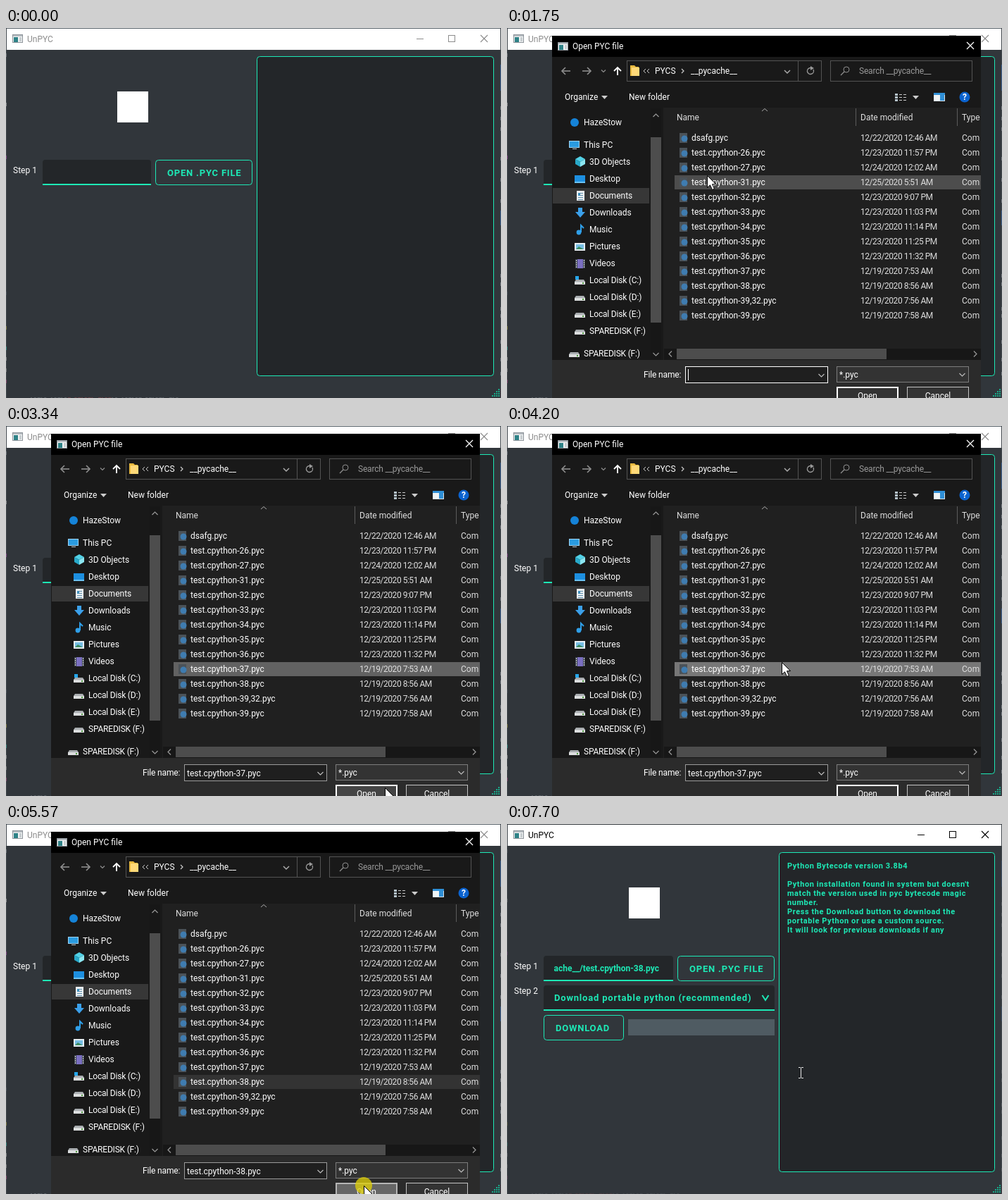
Recreate the animation shown at these times as an HTML page with a canvas. Size 703 px wide and 525 px high, loop 8000 ms.

```html
<!DOCTYPE html>
<html lang="en">
<head>
<meta charset="utf-8">
<title>UnPYC</title>
<style>
html, body { margin: 0; width: 100%; height: 100%; overflow: hidden; background: #31363b; }
canvas { display: block; width: 703px; height: 525px; }
</style>
</head>
<body>
<canvas id="stage" width="703" height="525"></canvas>
<script>
const g = document.getElementById('stage').getContext('2d');
const LOOP = 8000, TEAL = '#1de9b6', DARK = '#232629', FONT = 'Roboto, "Open Sans", sans-serif';

const FILES = [
  ['dsafg', '12/22/2020 12:46 AM'],
  ['test.cpython-26', '12/23/2020 11:57 PM'],
  ['test.cpython-27', '12/24/2020 12:02 AM'],
  ['test.cpython-31', '12/25/2020 5:51 AM'],
  ['test.cpython-32', '12/23/2020 9:07 PM'],
  ['test.cpython-33', '12/23/2020 11:03 PM'],
  ['test.cpython-34', '12/23/2020 11:14 PM'],
  ['test.cpython-35', '12/23/2020 11:25 PM'],
  ['test.cpython-36', '12/23/2020 11:32 PM'],
  ['test.cpython-37', '12/19/2020 7:53 AM'],
  ['test.cpython-38', '12/19/2020 8:56 AM'],
  ['test.cpython-39,32', '12/19/2020 7:56 AM'],
  ['test.cpython-39', '12/19/2020 7:58 AM']
];
const PLACES = ['3D Objects', 'Desktop', 'Documents', 'Downloads', 'Music', 'Pictures', 'Videos',
  'Local Disk (C:)', 'Local Disk (D:)', 'Local Disk (E:)', 'SPAREDISK (F:)'];
const REPORT = ['Python Bytecode version 3.8b4', '',
  "Python installation found in system but doesn't",
  'match the version used in pyc bytecode magic', 'number.',
  'Press the Download button to download the',
  'portable Python or use a custom source.',
  'It will look for previous downloads if any'];

// Pointer legs: start, end, steps, from x y, to x y
const LEGS = [
  [300, 770, 7, 474, 353, 270, 217],
  [990, 1260, 4, 276, 212, 278, 210],
  [1670, 1750, 2, 280, 210, 284, 209],
  [1870, 2260, 6, 288, 222, 345, 335],
  [2860, 2960, 2, 430, 430, 574, 503],
  [3140, 3410, 5, 560, 512, 515, 513],
  [3590, 3730, 2, 455, 440, 390, 337],
  [4200, 4230, 2, 390, 335, 390, 326],
  [4380, 4540, 3, 389, 338, 372, 362],
  [4780, 5140, 6, 375, 368, 500, 497],
  [5320, 5320, 1, 508, 513, 508, 513],
  [5810, 6060, 4, 490, 470, 417, 353]
];
const CLICKS = [[1080, 1260], [2560, 2700], [3880, 3970], [4540, 4780], [5570, 5660]];

const within = (t, a, b) => t >= a && t < b;

function pointer(t) {
  const leg = LEGS.filter(l => t >= l[0]).pop();
  if (!leg) return null;
  const [a, b, n, x0, y0, x1, y1] = leg;
  const k = n < 2 ? 1 : Math.min(n - 1, Math.floor((t - a) / (b - a) * (n - 1) + 1e-6)) / (n - 1);
  return { x: Math.round(x0 + (x1 - x0) * k), y: Math.round(y0 + (y1 - y0) * k) };
}

function box(x, y, w, h, color) {
  g.fillStyle = color;
  g.fillRect(x, y, w, h);
}
function frame(x, y, w, h, color, fill) {
  if (fill) box(x, y, w, h, fill);
  g.strokeStyle = color;
  g.lineWidth = 1;
  g.strokeRect(x + .5, y + .5, w - 1, h - 1);
}
function rounded(x, y, w, h, r, fill, stroke) {
  g.beginPath();
  g.roundRect(x, y, w, h, r);
  if (fill) { g.fillStyle = fill; g.fill(); }
  if (stroke) { g.strokeStyle = stroke; g.lineWidth = 1; g.stroke(); }
}
function dot(x, y, r, color) {
  g.fillStyle = color;
  g.beginPath();
  g.arc(x, y, r, 0, 7);
  g.fill();
}
function line(color, width, ...p) {
  g.strokeStyle = color;
  g.lineWidth = width;
  g.beginPath();
  for (let i = 0; i < p.length; i += 2) g.lineTo(p[i], p[i + 1]);
  g.stroke();
}
function poly(color, ...p) {
  g.fillStyle = color;
  g.beginPath();
  for (let i = 0; i < p.length; i += 2) g.lineTo(p[i], p[i + 1]);
  g.fill();
}
// y is the middle of the line
function text(s, x, y, color = '#fff', font = '12px', gap = 0, align = 'left') {
  g.font = font + ' ' + FONT;
  g.letterSpacing = gap + 'px';
  g.textAlign = align;
  g.fillStyle = color;
  g.fillText(s, x, y + 4);
}
const label = (s, x, y) => text(s, x, y, TEAL, 'bold 13px', .8);

// A negative rise points the chevron up
function chevron(x, y, size, color, width = 1.2, rise = size / 2) {
  line(color, width, x - size, y - rise, x, y + rise, x + size, y - rise);
}

function edges(active) {
  g.globalAlpha = active ? .25 : .6;
  [[38, '#8a8f94'], [108, '#bbb'], [183, '#b04fb0'], [376, '#59636b'], [425, '#a8a040'],
   [454, '#2fb5a5'], [469, '#aaa'], [485, '#999'], [501, '#b04f86']]
    .forEach(([y, c]) => box(0, y - 2, 1, 5, c));
  [113, 128, 143, 185, 215, 245, 351, 363, 398, 408, 445, 470, 490]
    .forEach(y => box(702, y - 2, 1, 5, '#9aa0a5'));
  box(702, 52, 1, 37, '#3f76bd');
  box(702, 259, 1, 21, '#3f76bd');
  for (let i = 0; i < 44; i++) {
    const x = 35 + i * 4.8;
    if (i % 7 !== 5) box(x, 524, 2 + i % 3, 1, x > 85 && x < 150 ? '#8d4b50' : '#747a80');
  }
  g.globalAlpha = 1;
}

function exeIcon(x, y) {
  frame(x, y, 15, 12, '#8b9298', '#f1f3f4');
  box(x + 1, y + 1, 13, 2, '#b7bdc2');
  box(x + 2, y + 4, 6, 7, '#2f8287');
  box(x + 10, y + 4, 3, 6, '#c7cdd0');
}

function field(x, y, w) {
  rounded(x, y, w, 36, [4, 4, 0, 0], DARK);
  box(x, y + 34, w, 2, TEAL);
}
function button(s, x, y, w) {
  rounded(x + .5, y + .5, w - 1, 35, 4, null, TEAL);
  label(s, x + 17, y + 19);
}

function app(active, done) {
  const shift = done ? 30 : 0;
  box(0, 0, 703, 525, '#31363b');
  box(0, 0, 703, 31, '#fff');
  box(0, 0, 703, 1, active ? '#33383d' : '#5b646b');
  box(0, 0, 1, 525, '#42484e');
  box(702, 0, 1, 525, '#42484e');
  edges(active);
  exeIcon(9, 9);
  const ink = active ? '#000' : '#8c8c8c';
  text('UnPYC', 30, 16, ink);
  line(ink, 1, 583, 15.5, 593, 15.5);
  g.strokeRect(628.5, 10.5, 9, 9);
  line(ink, 1.1, 674, 10, 684, 20);
  line(ink, 1.1, 684, 10, 674, 20);

  box(158 + shift / 2, 90, 44, 44, '#fff');
  text('Step 1', 10, 202);
  field(52, 187, 154 + shift);
  button('OPEN .PYC FILE', 212 + shift, 187, 138);
  rounded(356.5 + shift, 40.5, 336 - shift, 453, 4, DARK, TEAL);
  for (let i = 0; i < 4; i++)
    for (let j = 0; j <= i; j++) box(699 - j * 3, 512 + i * 3, 2, 2, '#19a98a');
  if (!done) return;

  g.save();
  g.beginPath();
  g.rect(67, 188, 152, 32);
  g.clip();
  text('ache__/test.cpython-38.pyc', 216, 205, TEAL, 'bold 12px', 0, 'right');
  g.restore();
  text('Step 2', 10, 237);
  field(52, 229, 328);
  label('Download portable python (recommended)', 67, 247);
  chevron(367, 246.5, 4.5, TEAL, 2, 3.5);
  button('DOWNLOAD', 52, 271, 114);
  box(172, 277, 208, 23, '#4f5b62');
  REPORT.forEach((s, i) => text(s, 398, 59 + i * 13, TEAL, 'bold 11px', .58));
}

function drive(x, y) {
  poly('#a9adb0', x + 2, y - 2, x + 13, y - 2, x + 15, y + 1, x, y + 1);
  box(x, y + 1, 15, 4, '#dcdedf');
  box(x + 11, y + 2, 2, 2, '#4c9a3c');
}
function monitor(x, y) {
  frame(x, y - 6, 15, 10, '#9fd4f3', '#2a9be0');
  box(x + 5, y + 5, 6, 1, '#bfc7cc');
}
const PLACE_ICONS = [
  (x, y) => {
    poly('#52d1e6', x, y - 4, x + 7, y - 8, x + 14, y - 4, x + 7, y);
    poly('#28a9c9', x, y - 4, x + 7, y, x + 7, y + 7, x, y + 3);
    poly('#8be6f1', x + 14, y - 4, x + 7, y, x + 7, y + 7, x + 14, y + 3);
  },
  (x, y) => { box(x - 1, y - 5, 15, 11, '#1d8fe0'); box(x - 1, y + 4, 15, 2, '#6cc4f5'); },
  (x, y) => {
    box(x + 2, y - 7, 11, 14, '#e9eef1');
    for (let i = 0; i < 4; i++) box(x + 4, y - 4 + i * 3, 7, 1, '#5f90ad');
    box(x + 4, y - 4, 3, 4, '#3f8fbd');
  },
  (x, y) => {
    box(x + 4, y - 7, 6, 6, '#3ba0ea');
    poly('#3ba0ea', x, y - 1, x + 14, y - 1, x + 7, y + 7);
  },
  (x, y) => {
    dot(x + 5, y + 4, 3.4, '#2f9fe8');
    line('#2f9fe8', 2, x + 8, y + 4, x + 8, y - 6, x + 12, y - 2);
  },
  (x, y) => {
    box(x - 1, y - 5, 15, 11, '#e5eef3');
    box(x + 1, y - 3, 11, 7, '#75bde3');
    poly('#3e8c62', x + 1, y + 4, x + 5, y, x + 12, y + 4);
  },
  (x, y) => {
    box(x, y - 6, 14, 13, '#39414a');
    box(x + 3, y - 6, 8, 13, '#7a6fc0');
    for (let i = 0; i < 4; i++) { box(x + 1, y - 5 + i * 3, 1, 2, '#ddd'); box(x + 12, y - 5 + i * 3, 1, 2, '#ddd'); }
  },
  (x, y) => { drive(x - 1, y + 1); box(x, y - 6, 5, 5, '#25a6ea'); }
];

function navPane() {
  dot(96, 134, 6, '#1583d8');
  text('HazeStow', 109, 134);
  monitor(88, 166);
  text('This PC', 109, 166);
  box(65, 227, 137, 22, '#373737');
  PLACES.forEach((s, i) => {
    const y = 190 + i * 24;
    (PLACE_ICONS[i] || ((x, yy) => drive(x - 1, yy)))(97, y);
    text(s, 117, y, '#fff', '12px', i > 6 ? -.2 : 0);
  });
  drive(88, 462);
  text('SPAREDISK (F:)', 109, 462, '#fff', '12px', -.2);
  box(204, 114, 15, 357, '#171717');
  box(204, 155, 15, 263, '#4d4d4d');
  chevron(211.5, 124, 4, '#999', 1.2, -2);
  chevron(211.5, 463, 4, '#999');
}

function toolbar() {
  const grey = '#8f8f8f';
  const arrow = (x, d, c) => {
    line(c, 1.6, x - 6, 61, x + 6, 61);
    line(c, 1.6, x + d, 56, x + 6 * d, 61, x + d, 66);
  };
  arrow(84, -1, grey);
  arrow(113, 1, grey);
  chevron(137, 61, 3, grey);
  line('#fff', 1.8, 157, 67, 157, 56);
  line('#fff', 1.8, 152, 61, 157, 56, 162, 61);

  frame(170, 46, 277, 30, '#535353');
  poly('#e8b93f', 175, 53, 181, 53, 183, 55, 187, 55, 187, 68, 175, 68);
  box(177, 56, 11, 12, '#ffd978');
  [194, 199].forEach(x => line('#ccc', 1, x + 3, 58, x, 61, x + 3, 64));
  text('PYCS', 210, 61);
  line('#ccc', 1.2, 248, 58, 251, 61, 248, 64);
  text('__pycache__', 261, 61);
  chevron(398, 62, 4, '#aaa', 1.5);
  box(413, 47, 1, 28, '#535353');
  g.strokeStyle = '#999';
  g.lineWidth = 1.4;
  g.beginPath();
  g.arc(431, 61, 4.5, -.5, 4.9);
  g.stroke();
  poly('#999', 431, 54, 436, 57, 431, 60);

  frame(459, 46, 202, 30, '#535353');
  g.strokeStyle = grey;
  g.beginPath();
  g.arc(482, 59, 4, 0, 7);
  g.stroke();
  line(grey, 1.3, 479, 62, 474, 67);
  text('Search __pycache__', 500, 61, '#999', '12px', -.2);

  text('Organize', 82, 98);
  poly('#ccc', 134, 96, 143, 96, 138.5, 101);
  text('New folder', 173, 98);
  for (let i = 0; i < 3; i++) {
    box(551, 93 + i * 4, 4, 3, '#b5c2ca');
    box(557, 94 + i * 4, 4, 1, '#ccc');
    box(563, 94 + i * 4, 4, 1, '#ccc');
  }
  poly('#ccc', 576, 96, 585, 96, 580.5, 101);
  frame(606, 92, 16, 12, '#d7e2e8', '#eef3f5');
  box(606, 92, 16, 3, '#2f8fd6');
  box(615, 95, 6, 8, '#2f8fd6');
  dot(650, 98, 7.5, '#0b63cf');
  text('?', 650, 98, '#fff', 'bold 12px', 0, 'center');
}

function fileList(hover, sel, blurred) {
  line('#aaa', 1, 362, 118, 366, 114.5, 370, 118);
  text('Name', 241, 127, '#ddd');
  text('Date modified', 502, 127, '#ddd');
  text('Type', 646, 127, '#ddd');
  box(495, 114, 1, 25, '#5c5c5c');
  box(639, 114, 1, 25, '#5c5c5c');
  FILES.forEach(([name, date], i) => {
    const y = 156 + i * 21;
    let fill = null;
    if (i === sel) fill = blurred ? '#333' : i === hover ? '#777' : '#626262';
    else if (i === hover) fill = '#4d4d4d';
    if (fill) box(238, y - 10, 435, 20, fill);
    box(245, y - 7, 11, 14, '#4b5258');
    dot(252, y + 1, 4.5, '#3f7cb0');
    text(name + '.pyc', 262, y);
    text(date, 502, y, '#ddd', '12px', -.47);
    text('Com', 646, y, '#ddd');
  });
  box(223, 455, 450, 16, '#171717');
  box(241, 455, 298, 15, '#4d4d4d');
  line('#999', 1.2, 234, 458.5, 230, 462.5, 234, 466.5);
  line('#999', 1.2, 663, 458.5, 667, 462.5, 663, 466.5);
}

function dialog(t, p) {
  g.save();
  g.beginPath();
  g.rect(64, 11, 609, 514);
  g.clip();
  box(64, 11, 609, 514, '#191919');
  box(64, 11, 609, 30, '#000');
  exeIcon(72, 20);
  text('Open PYC file', 93, 26);
  line('#fff', 1.2, 653, 20, 663, 30);
  line('#fff', 1.2, 663, 20, 653, 30);
  if (t < 1670) { g.restore(); return; }

  box(222, 113, 451, 358, '#202020');
  box(64, 471, 609, 54, '#2b2b2b');
  toolbar();
  navPane();
  const inList = p.x >= 238 && p.y >= 145 && p.y < 418;
  const sel = t >= 4540 ? 10 : t >= 2560 ? 9 : -1;
  const pressed = t >= 5570;
  fileList(inList ? Math.floor((p.y - 145) / 21) : -1, sel, pressed);

  text('File name:', 194, 492, '#fff', '12px', -.15);
  frame(253, 480, 203, 24, t < 2700 ? '#fff' : '#9b9b9b', '#1f1f1f');
  if (sel < 0) box(257, 484, 1, 16, '#fff');
  else text(FILES[sel][0] + '.pyc', 257, 493);
  chevron(446.5, 493, 4, '#bbb');
  const onFilter = p.x >= 468 && p.x < 655 && p.y >= 481 && p.y < 503;
  frame(468, 480, 188, 23, onFilter ? '#ccc' : '#7d7d7d', onFilter ? '#454545' : '#333');
  text('*.pyc', 472, 492);
  chevron(646.5, 492, 4, '#bbb');

  const onOpen = p.x >= 468 && p.x < 556 && p.y >= 509;
  box(468, 509, 88, 16, pressed ? '#b5b5b5' : '#fff');
  box(470, 511, 84, 14, pressed ? '#666' : onOpen ? '#454545' : '#333');
  text('Open', 512, 522, '#fff', '12px', 0, 'center');
  frame(568, 509, 88, 24, '#c4c4c4', '#333');
  text('Cancel', 612, 522, '#fff', '12px', 0, 'center');
  g.restore();
}

function drawPointer(p, beam) {
  const { x, y } = p;
  if (beam) {
    box(x, y - 7, 1, 14, '#e8e8e8');
    [-8, 7].forEach(d => { box(x - 3, y + d, 3, 1, '#e8e8e8'); box(x + 1, y + d, 3, 1, '#e8e8e8'); });
    return;
  }
  g.beginPath();
  [[0, 0], [0, 17], [4, 13.3], [7, 20], [10, 18.7], [7, 12.2], [12, 12]]
    .forEach(([dx, dy]) => g.lineTo(x + .5 + dx, y + .5 + dy));
  g.closePath();
  g.fillStyle = '#fff';
  g.fill();
  g.strokeStyle = '#000';
  g.lineWidth = 1;
  g.stroke();
}

function draw(t) {
  const p = pointer(t), done = t >= 7700, open = within(t, 1530, 5660);
  app(within(t, 990, 1260) || t >= 5810, done);
  if (open) dialog(t, p);
  if (!p) return;
  if (CLICKS.some(([a, b]) => within(t, a, b))) dot(p.x, p.y, 12, 'rgba(222,206,10,.78)');
  const overPanel = p.x > (done ? 386 : 356) && p.x < 693 && p.y > 40 && p.y < 494;
  drawPointer(p, !open && overPanel);
}

const start = performance.now();
function tick() {
  draw((performance.now() - start) % LOOP);
  requestAnimationFrame(tick);
}
draw(0);
requestAnimationFrame(tick);
</script>
</body>
</html>
```
